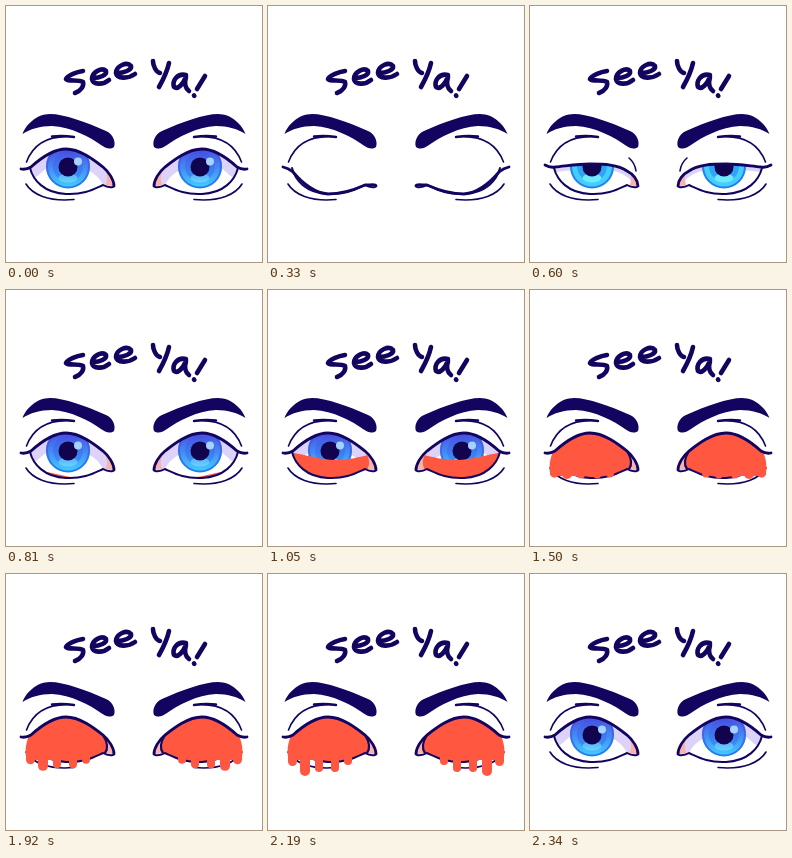
Recreate the animation shown at these times as an HTML page with a canvas. Size 256 by 256 pixels, loop 2.4 s.

```html
<!DOCTYPE html>
<html lang="en">
<head>
<meta charset="utf-8">
<title>See Ya!</title>
<style>
  html, body { margin: 0; width: 100%; height: 100%; overflow: hidden; background: #fff; }
  canvas { display: block; width: 256px; height: 256px; }
</style>
</head>
<body>
<canvas id="stage" width="256" height="256" role="img" aria-label="See Ya!"></canvas>
<script>
const ctx = document.getElementById('stage').getContext('2d');
const LOOP = 2400, STEP = 30;
const NAVY = '#13055f', RED = '#ff5740';
const clamp = v => Math.max(0, Math.min(1, v));

const brow = new Path2D('M16.5 128 C20 119 30 108 44 108 C58 108 80 116 100 125 C107 128 110 136 108 141 C104 144 99 142 95 139 C84 131 65 121 46 120 C34 120 24 123 16.5 128 Z');
const creases = new Path2D('M20.5 156 C25 144 36 128 68 131 M20 178 C26 188 42 196 68 193.5');
const creaseEnd = new Path2D('M46 130.5 Q56 129 68 131');
const innerFold = new Path2D('M99 152 Q105 157 106 165');
const lowerOuter = new Path2D('M24 162 C27 174 38 187 60 188');
const lowerInner = new Path2D('M60 188 C78 189 88 183 97 179 Q102 182 107 181');
const caruncle = new Path2D('M98 163 C102 169 102 175 99 180 L108 181 L108 174 Z');
const caruncleEdge = new Path2D('M97 161 C102 169 102 175 99 179');
const spillBody = new Path2D('M23 162 C20 168 18 179 21 186 H84 L90 177 L60 160 Z');
const letters = new Path2D(
  'M77 65 C71 66 62 69 60 73 C63 76 72 73 77 76 C78 80 75 85 69 87' +
  'M87 72 C94 72 101 69 100 65 C96 61 86 66 86 73 C87 79 97 79 103 74' +
  'M111 67 C118 67 126 64 125 60 C121 55 110 60 110 67 C111 73 122 73 129 68' +
  'M147 55 C147 60 150 66 154 67 M163 57 C161 66 157 74 153 81' +
  'M180 69 C171 67 166 75 168 81 C172 84 177 78 180 71 C178 78 179 82 183 85' +
  'M199 70 L191 83 M188 89.5 L188.3 89.8');

// The upper lid keeps its x positions; each pose has its own heights.
const lidX = [15, 20, 25, 36, 48, 60, 74, 88, 97, 103, 108, 108];
const lidY = {
  open:   [163, 164, 161, 151, 143, 143, 143, 154, 161, 166, 174, 180],
  half:   [159, 162, 161, 160, 158, 158, 158, 158.5, 165, 168, 174, 180],
  closed: [161, 162, 166, 179, 187, 188, 188, 183, 179, 179, 178, 180]
};
const lids = {};
for (const pose in lidY) {
  const p = lidY[pose].map((y, i) => lidX[i] + ' ' + y);
  const upper = `M${p[0]} Q${p[1]} ${p[2]} C${p.slice(3, 6).join(' ')} C${p.slice(6, 9).join(' ')} C${p.slice(9).join(' ')}`;
  lids[pose] = {
    upper: new Path2D(upper),
    opening: new Path2D(upper + ' L97 179 C88 183 78 189 60 188 C38 187 27 174 24 162 Z')
  };
}

// x, lowest point, width
const drips = [[24.5, 192, 9], [37, 202, 10], [51, 198, 8], [67, 198, 8], [80, 191, 8]];

const irisShade = ctx.createLinearGradient(0, 143, 0, 182);
irisShade.addColorStop(0, 'rgba(72, 70, 220, .95)');
irisShade.addColorStop(.5, 'rgba(70, 95, 238, .6)');
irisShade.addColorStop(1, 'rgba(70, 110, 245, 0)');

function stroke(path, color, width) {
  ctx.strokeStyle = color;
  ctx.lineWidth = width;
  ctx.stroke(path);
}

function fill(path, color) {
  ctx.fillStyle = color;
  ctx.fill(path);
}

function disc(x, y, rx, ry, color) {
  ctx.fillStyle = color;
  ctx.beginPath();
  ctx.ellipse(x, y, rx, ry, 0, 0, 2 * Math.PI);
  ctx.fill();
}

function poseAt(t) {
  for (const start of [300, 600, 2220]) {
    const dt = t - start;
    if (dt >= 0 && dt < 120) return dt < STEP ? 'half' : 'closed';
  }
  return 'open';
}

function drawIris(side, shaded) {
  disc(62, 160.5, 22, 22, '#1f80ee');
  disc(62, 160.5, 20, 20, '#45cdfd');
  disc(62, 160.5, 15, 15, '#2fa4f6');
  disc(62, 172, 9.5, 4.5, '#6deaff');
  if (shaded) disc(62, 160.5, 22, 22, irisShade);
  disc(62, 161, 9.5, 9.5, '#12034f');
  // Highlights fall on the same side of both eyes.
  if (shaded) disc(62 + side * 10, 155.5, 4, 4, '#a5d2ff');
}

function drawPool(t, level) {
  ctx.fillStyle = RED;
  ctx.beginPath();
  ctx.moveTo(22, 192);
  for (let x = 22; x <= 102; x += 4) {
    ctx.lineTo(x, level + 4 * Math.sin((x - 40) / 18 + (t - 1050) / 300));
  }
  ctx.lineTo(102, 192);
  ctx.fill();
}

function drawSpill(spill, run) {
  ctx.save();
  ctx.beginPath();
  ctx.rect(0, 161, 128, 26 * spill);
  ctx.clip();
  fill(spillBody, RED);
  ctx.restore();
  stroke(lowerInner, NAVY, 2);
  if (run === 0) return;
  for (const [x, end, width] of drips) {
    const bottom = 187 + (end - 187) * run - width / 2;
    stroke(new Path2D(`M${x} 176 V${bottom}`), RED, width);
  }
}

function drawEye(t, side) {
  const pose = poseAt(t);
  const { upper, opening } = lids[pose];
  const level = 192 - (t - 720) * .079;
  const retreat = 1 - clamp((t - 2190) / 150);
  const spill = clamp((t - 1320) / 180) * retreat;
  const run = clamp((t - 1400) / 790) * retreat;
  const bleeding = t >= 720 && t < 2340;

  ctx.save();
  if (side < 0) {
    ctx.translate(256, 0);
    ctx.scale(-1, 1);
  }
  fill(brow, NAVY);
  stroke(creases, NAVY, 1.6);
  stroke(creaseEnd, NAVY, 2.4);
  if (pose === 'half') stroke(innerFold, NAVY, 1.6);

  ctx.save();
  ctx.clip(opening);
  stroke(upper, '#dcd2fa', pose === 'open' ? 22 : 10);
  drawIris(side, pose === 'open');
  if (bleeding) drawPool(t, level);
  fill(caruncle, '#f7b3ad');
  if (bleeding && level < 162) stroke(caruncleEdge, NAVY, 2.2);
  ctx.restore();

  stroke(lowerOuter, NAVY, 2);
  drawSpill(spill, run);
  stroke(upper, NAVY, 2.8);
  ctx.restore();
}

function draw(now) {
  const t = Math.floor(now % LOOP / STEP) * STEP;
  ctx.fillStyle = '#fff';
  ctx.fillRect(0, 0, 256, 256);
  ctx.lineCap = ctx.lineJoin = 'round';
  stroke(letters, NAVY, 4.6);
  drawEye(t, 1);
  drawEye(t, -1);
}

const start = performance.now();
function tick() {
  draw(performance.now() - start);
  requestAnimationFrame(tick);
}
tick();
</script>
</body>
</html>
```
